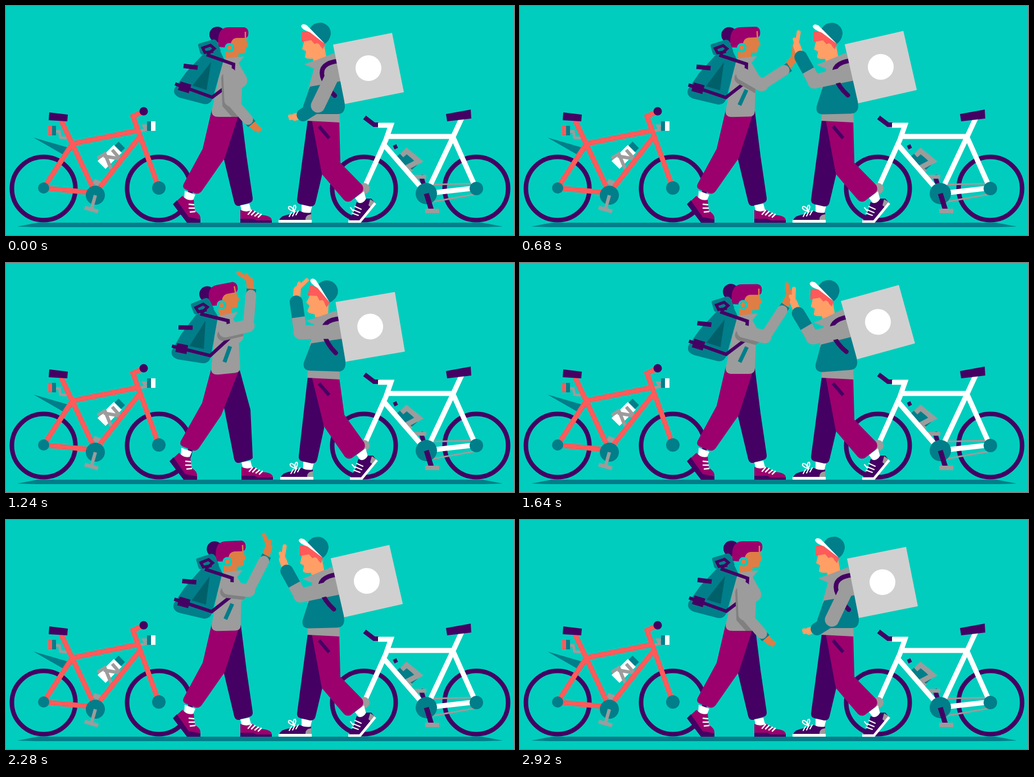
Write an HTML page with a canvas that moves like this. It is 904 px wide and 409 px high and loops after 3040 ms.

```html
<!DOCTYPE html>
<html lang="en">
<head>
<meta charset="utf-8">
<title>High five</title>
<style>
  html, body { margin: 0; width: 100%; height: 100%; overflow: hidden; background: #00cdbd; }
  canvas { display: block; }
</style>
</head>
<body>
<canvas id="stage" width="904" height="409"></canvas>
<script>
const ctx = document.getElementById('stage').getContext('2d');
const sea = '#00cdbd', ink = '#440063', plum = '#9c006d', teal = '#007e8a', grey = '#9c9c9c';
const shade = '#808080', red = '#ff5a5a', white = '#fff', tan = '#de7e45', peach = '#ff9f66';

// Pose: step, reach,
// her: lean, elbow x, y, forearm angle, length, palm angle, finger angle,
// his: lean, head tilt, elbow x, y, forearm angle, length, palm angle, finger angle, grey sleeve
const rest  = [0, .35, 0, 400, 168, 49, 46, 45, 20, 0, 0, 555, 178, 148, 31, 165, 190, 0];
const lift  = [0, 1, -1.2, 430, 141, -33, 48, -55, -85, -1.6, 1, 524, 135, 241, 50, 250, 279, .45];
const wind  = [1, 1, -5.8, 431, 112, -85, 55, -97, -146, 1.7, 11, 524, 124, 262, 55, 275, 315, .5];
const slap  = [0, 1, -.3, 436, 132, -57, 56, -65, -97, -4.2, 4, 521, 133, 239, 50, 247, 272, .45];
const part  = [0, 1, -1.5, 432, 126, -63, 59, -72, -110, -1.6, 1, 524, 135, 241, 50, 250, 279, .45];
const lower = [0, .65, -.9, 406, 155, 15, 55, 5, -15, -.5, 0, 546, 173, 159, 29, 172, 205, 0];
const keys = [[0, rest], [320, rest], [680, lift], [1220, wind], [1300, wind], [1640, slap],
  [2280, part], [2600, lower], [2920, rest], [3040, rest]];

function fill(color, d) {
  ctx.fillStyle = color;
  ctx.fill(new Path2D(d));
}
function line(color, width, d, cap = 'butt') {
  ctx.strokeStyle = color;
  ctx.lineWidth = width;
  ctx.lineCap = cap;
  ctx.stroke(new Path2D(d));
}
function dot(color, x, y, r) {
  ctx.fillStyle = color;
  ctx.beginPath();
  ctx.arc(x, y, r, 0, 7);
  ctx.fill();
}
function ring(color, x, y, r, width) {
  ctx.strokeStyle = color;
  ctx.lineWidth = width;
  ctx.beginPath();
  ctx.arc(x, y, r, 0, 7);
  ctx.stroke();
}
function turned(x, y, deg, draw) {
  ctx.save();
  ctx.translate(x, y);
  ctx.rotate(deg * Math.PI / 180);
  ctx.translate(-x, -y);
  draw();
  ctx.restore();
}
function shifted(dx, draw) {
  ctx.save();
  ctx.translate(dx, 0);
  draw();
  ctx.restore();
}
function go([x, y], deg, len) {
  const a = deg * Math.PI / 180;
  return [x + len * Math.cos(a), y + len * Math.sin(a)];
}
function swing([x, y], [px, py], deg) {
  const a = Math.atan2(y - py, x - px) * 180 / Math.PI;
  return go([px, py], a + deg, Math.hypot(x - px, y - py));
}
const path = (...pts) => 'M' + pts.join('L');

// Monotone cubic through the keys
function poseAt(t) {
  let i = 0;
  while (i < keys.length - 2 && t >= keys[i + 1][0]) i++;
  const span = keys[i + 1][0] - keys[i][0], u = (t - keys[i][0]) / span;
  return rest.map((_, c) => {
    const rate = n => keys[n] && keys[n + 1] ? (keys[n + 1][1][c] - keys[n][1][c]) / (keys[n + 1][0] - keys[n][0]) : 0;
    const slope = n => {
      const a = rate(n - 1), b = rate(n);
      return a * b > 0 ? 2 * a * b / (a + b) : 0;
    };
    const from = keys[i][1][c], to = keys[i + 1][1][c], v = 1 - u;
    return from + (to - from) * u * u * (3 - 2 * u) + span * u * v * (v * slope(i) - u * slope(i + 1));
  });
}

function leftBike() {
  ring(ink, 67, 326, 56.5, 8);
  ring(ink, 272, 326, 56.5, 8);
  fill(teal, 'M49 235L118 255L108 269Z');
  line(grey, 5, 'M89 224H95L97 235L108 236');
  fill(red, 'M75 214h7v17h-7z');
  fill(teal, 'M82 214h7v17h-7z');
  line(grey, 5, 'M238 223L249 221L245 214H254');
  fill(teal, 'M251 206h7v17h-7z');
  fill(white, 'M258 206h8v17h-8z');
  line(grey, 9, 'M156 313L171 319');
  line(white, 20, 'M170 284L199 255');
  line(teal, 16, 'M199 255L206 248');
  line(grey, 6, 'M163 272L176 264L187 291M174 268L203 273L189 257');
  line(red, 9, 'M159 334L67 325L118 246L237 222M98 204L159 334L239 232M245 188L226 197L239 233L272 325');
  fill(ink, 'M77 190L110 194L109 206L76 204Z');
  dot(ink, 245, 188, 7.5);
  dot(teal, 67, 325, 10);
  dot(teal, 272, 325, 12);
  dot(teal, 159, 338, 17);
  line(grey, 6, 'M159 338L152 363');
  line(grey, 7, 'M140 360L164 367');
}

function rightBike() {
  ring(ink, 637, 326, 56.5, 8);
  ring(ink, 837, 326, 56.5, 8);
  line(ink, 8, 'M638 199L655 212H664');
  line(teal, 19, 'M702 263L725 290');
  line(ink, 7, 'M690 253L696 250');
  line(grey, 9, 'M704 267L713 259L735 277L712 289L721 297');
  line(ink, 8, 'M738 302L748 335');
  line(grey, 7, 'M725 305H748');
  line(grey, 3, 'M752 319L836 317M752 351L836 336');
  line(white, 9, 'M662 213H685L676 239L637 326M678 233H795L836 325L748 335L671 246M812 198L795 235L748 335');
  fill(ink, 'M783 193L827 185L828 201L785 206Z');
  dot(grey, 637, 326, 10);
  dot(teal, 837, 326, 12);
  dot(teal, 748, 335, 19);
  line(ink, 9, 'M748 335L757 364');
  line(grey, 8, 'M746 366H771');
}

function hand(skin, wrist, palmDeg, fingerDeg, reach, side) {
  const palm = go(wrist, palmDeg, 12 + 10 * reach);
  line(skin, 13, path(wrist, palm), 'round');
  line(skin, 7, path(palm, go(palm, fingerDeg, 24 * reach)), 'round');
  line(skin, 6, path(palm, go(palm, fingerDeg + 28 * side, 6 + 6 * reach)), 'round');
}

function herLegs(k) {
  fill(ink, `M${418 - 3 * k} 188L${428 + 7 * k} ${268 - 6 * k}L439 ${343 + 3 * k}Q440 350 432 352L415 357Q408 358 406 350L${387 + k} ${270 - 12 * k}L398 190Z`);
  shifted(-6 * k, () => {
    fill(white, 'M318 330L337 337L331 351L317 346Z');
    fill(plum, 'M314 339Q322 349 334 346L336 366Q347 372 346 381H322L303 349Z');
    fill(ink, 'M297 354L304 347L325 377L346 381V387H322Z');
    line(white, 2.5, 'M325 354L335 355M325 361L336 361M327 368L337 367');
  });
  shifted(2 * k, () => {
    fill(white, 'M417 356L433 353L437 368L420 368Z');
    fill(plum, 'M417 364Q428 370 438 364L452 373Q473 374 473 383H417Z');
    fill(ink, 'M417 380H440L446 383H473V387H417Z');
    line(white, 2.5, 'M431 372L437 365M437 373L443 367M443 375L449 370M449 377L454 372', 'round');
  });
  fill(plum, `M366 186L${350 - k} ${255 - 5 * k}L${316 - 5 * k} 318Q${313 - 5 * k} 325 ${320 - 5 * k} 328L${338 - 5 * k} 335Q${344 - 5 * k} 336 ${348 - 5 * k} 331L${389 - 6 * k} 272L416 188Z`);
}

function herHead() {
  dot(ink, 376, 51, 14);
  fill(tan, 'M400 50L427 46L428 62L431 71L427 74L426 82Q424 85 414 84L413 97L390 97L391 60Z');
  fill(plum, 'M378 73Q374 38 396 38L424 38Q433 40 431 52Q430 57 425 57H410Q402 58 400 67L390 74Z');
  line(tan, 2.5, 'M426 46V60');
  ring(sea, 397.5, 74.5, 6.5, 4);
}

function her([lean, ex, ey, foreDeg, foreLen, palmDeg, fingerDeg], reach) {
  const hip = [390, 200], elbow = [ex, ey], wrist = go(elbow, foreDeg, foreLen);
  const shoulder = swing([398, 122], hip, lean);
  const torso = 'M388 94L424 90L414 102L428 127Q433 139 420 146L418 188Q418 198 408 198H378Q366 198 366 188L378 130Z';
  turned(...hip, lean, () => {
    turned(400, 92, lean * .8, herHead);
    fill(teal, 'M349 88L379 76L388 95L368 164Q364 177 352 175L310 164Q296 159 300 147L320 119Z');
    fill('#00606a', 'M365 100L357 150L332 142Z');
    line(ink, 8, 'M316 107L341 110');
    fill(teal, 'M344 67L368 60Q373 59 376 64L382 80L373 88L350 87Q346 87 345 82L342 71Q341 68 344 67Z');
    line(ink, 5, 'M369 81L354 83L350 75L364 70L371 76L359 86');
    fill(grey, torso);
    line(ink, 6, 'M357 87L405 104L403 136L367 163L301 139');
    turned(317, 145, 17, () => fill(ink, 'M308 137h20v16h-20z'));
    line(teal, 7, 'M404 150L391 177');
    ctx.save();
    ctx.clip(new Path2D(torso));
    const under = [shoulder, elbow, wrist].map(p => swing(p, hip, -lean)).map(([x, y]) => [x - 5, y + 7]);
    line(shade, 20, path(...under), 'round');
    ctx.restore();
  });
  hand(tan, go(wrist, foreDeg, 4), palmDeg, fingerDeg, reach, 1);
  line(teal, 17, path(wrist, go(wrist, foreDeg, 11)));
  line(grey, 23, path(shoulder, elbow), 'round');
  line(grey, 19, path(elbow, wrist), 'round');
}

function hisLegs(k) {
  shifted(3 * k, () => {
    fill(white, 'M526 355L545 356L541 372H526Z');
    fill(ink, 'M486 382Q490 374 505 372L523 366Q532 371 543 369V383H486Z');
    fill(grey, 'M533 383Q532 373 543 372V383Z');
    fill(white, 'M485 382H544V387H485Z');
    line(white, 2, 'M504 376L508 369M510 375L514 367M516 373L520 366M512 367Q499 362 504 358Q510 358 512 367Q510 355 515 356Q517 361 512 367', 'round');
    fill(white, 'M621 343L637 331L641 346L630 355Z');
    fill(ink, 'M624 350Q634 356 641 344L650 344L657 352L632 382L611 386Q610 378 618 371Z');
    fill(grey, 'M645 356L648 345L657 351L650 360Z');
    line(white, 4.5, 'M657 352L630 385H609');
    line(white, 2, 'M616 370L627 374M618 364L630 369M621 358L632 363M618 366L613 360', 'round');
  });
  fill(ink, `M537 203L${518 + 3 * k} 345Q${517 + 3 * k} 352 ${524 + 3 * k} 354L${541 + 3 * k} 358Q${549 + 3 * k} 359 ${551 + 3 * k} 350L${564 + 2 * k} 295L560 203Z`);
  fill(plum, `M544 203L593 205L${595 + 7 * k} ${280 - 9 * k}L${634 + 3 * k} 320Q${638 + 3 * k} 327 ${633 + 3 * k} 333L${614 + 2 * k} 348Q${607 + 2 * k} 352 ${601 + 2 * k} 346L${562 + 4 * k} ${300 - 8 * k}Z`);
  line(ink, 6, 'M557 215L575 236');
  fill(grey, 'M537 189H593L594 208L536 205Z');
}

function hisHead() {
  fill(peach, 'M532 57L527 77L534 81L532 91Q534 95 546 94L548 99L570 91L565 64L545 52Z');
  fill(red, 'M527 45L540 46L568 67L564 77L554 66L549 68L543 61L526 64Z');
  dot(peach, 554, 72, 5);
  fill(teal, 'M541 40Q548 28 563 30Q578 35 578 50Q576 62 567 68Z');
  fill(white, 'M525 36Q527 30 535 34L568 68L541 47Q526 42 525 36Z');
}

function his([lean, tilt, ex, ey, foreDeg, foreLen, palmDeg, fingerDeg, sleeve], reach) {
  const hip = [562, 218], elbow = [ex, ey], wrist = go(elbow, foreDeg, foreLen);
  const shoulder = swing([582, 122], hip, lean);
  turned(...hip, lean, () => {
    turned(556, 90, tilt, hisHead);
    fill(grey, 'M531 104L551 97L584 84L600 140L538 148L548 112Z');
    fill(teal, 'M541 144L597 134L602 164L603 180Q602 193 590 193H540Q526 192 529 178Z');
    line(ink, 8, 'M592 98Q557 102 563 126Q569 145 585 160', 'round');
  });
  hand(peach, wrist, palmDeg, fingerDeg, reach, -1);
  line(teal, 23, path(elbow, wrist), 'round');
  line(grey, 25, path(shoulder, elbow), 'round');
  line(grey, 23.5, path(elbow, go(elbow, foreDeg, foreLen * sleeve)));
  turned(...hip, lean, () => {
    fill('#d0d0d0', 'M582 69L687 48L708 154L603 175Z');
    dot(white, 645, 111, 23);
  });
}

function draw(t) {
  const pose = poseAt(t), [step, reach] = pose;
  fill(sea, 'M0 0H904V409H0Z');
  fill(teal, 'M20 394L56 387H848L884 394L850 395H54Z');
  leftBike();
  rightBike();
  herLegs(step);
  her(pose.slice(2, 9), reach);
  hisLegs(step);
  his(pose.slice(9), reach);
}

const start = performance.now();
function frame() {
  const t = (performance.now() - start) % 3040;
  draw(Math.floor(t / 40) * 40);
  requestAnimationFrame(frame);
}
frame();
</script>
</body>
</html>
```
